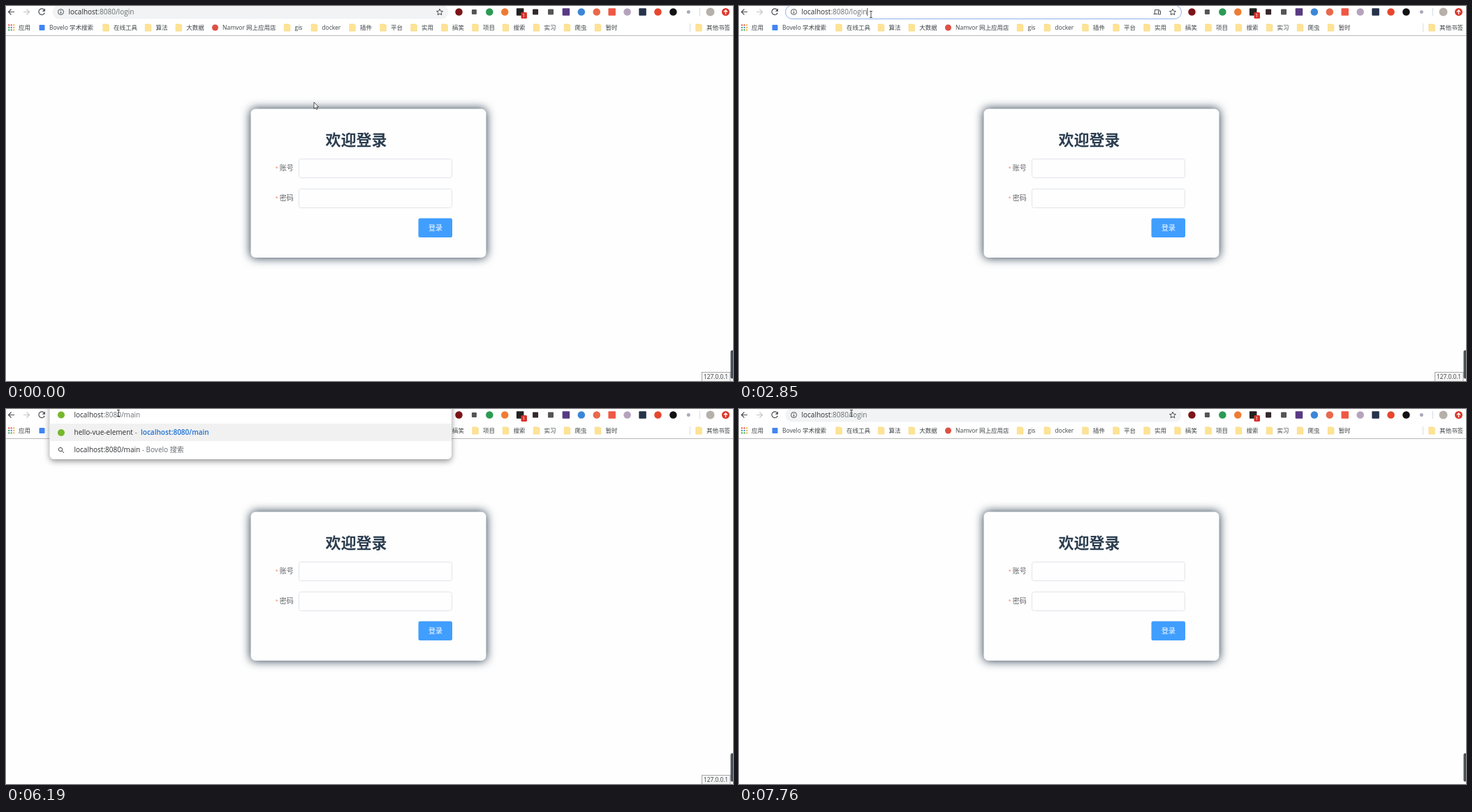
Write an HTML page that moves like this. It is 1041 by 538 pixels and loops after 8 s.

```html
<!DOCTYPE html>
<html lang="zh-CN">
<head>
<meta charset="utf-8">
<title>Login</title>
<style>
  html, body { margin: 0; width: 100%; height: 100%; overflow: hidden; background: #fefefe; }
  svg { display: block; }
  text { font: 10px "Open Sans", "Noto Sans CJK SC", "Noto Sans CJK", sans-serif; white-space: pre; fill: #2b2d30; }
  .small text, text.small { font-size: 8.5px; fill: #3c4043; }
  .line { fill: none; stroke: #4a4d51; stroke-width: 1.2; }
  .thin { stroke-width: 1; }
  .gray { fill: #686d72; }
  .label { fill: #606266; }
  .star { font-size: 7px; fill: #f0825f; }
  .field { fill: #fefefe; stroke: #e2e4ea; }
  #shadow { fill: #2c3e50; filter: blur(7px); }
  #drop { filter: drop-shadow(0 3px 4px rgba(0, 0, 0, .42)); }
</style>
</head>
<body>
<svg width="1041" height="538" viewBox="0 0 1041 538">
  <rect width="1041" height="43" fill="#fff"/>
  <path d="M0 42.5H1041" stroke="#b8b8b8"/>

  <g id="toolbar">
    <path class="line" d="M12 8.5H3.5M7.500 4.500l-4 4 4 4"/>
    <path class="line" d="M25 8.5h8.5M29.5 4.5l4 4-4 4" style="stroke:#c4c6c8"/>
    <g id="reload">
      <path class="line" d="M54.3 5.2A4.3 4.3 0 1 0 55.3 9.7"/>
      <path d="M56 3.5v4.3h-4.3z" fill="#4a4d51"/>
    </g>
    <path id="stop" class="line" d="M47.5 4.5l8 8m0-8l-8 8"/>
    <rect id="pill" x="66.5" y="-1" width="567" height="19.5" rx="9.75"/>
    <g id="info">
      <circle class="line thin" cx="78.5" cy="8.5" r="4"/>
      <path class="line" d="M78.5 8v3M78.5 6v1"/>
    </g>
    <path id="star" class="line thin" d="M621 4.2l1.3 3 3.2.3-2.4 2.1.7 3.2-2.8-1.7-2.8 1.7.7-3.2-2.4-2.1 3.2-.3z"/>
    <path id="device" class="line thin" d="M602 5.5H595.5V11M593.5 11.5h6M600.5 7h3v5h-3z"/>
  </g>
  <g id="extensions"></g>
  <g id="bookmarks" class="small"></g>

  <g id="card">
    <rect id="shadow" x="350" y="147" width="338" height="214.5" rx="7"/>
    <rect x="350.5" y="147.5" width="337" height="213.5" rx="7" fill="#fefefe"/>
    <text x="457.5" y="199.7" style="font-size:22px;font-weight:700;fill:#2c3e50">欢迎登录</text>
    <text class="star" x="385.7" y="235.3">*</text>
    <text class="label" x="391.7" y="236.3">账号</text>
    <rect class="field" x="419.5" y="219.5" width="219" height="27" rx="3"/>
    <text class="star" x="385.7" y="278.3">*</text>
    <text class="label" x="391.7" y="279.3">密码</text>
    <rect class="field" x="419.5" y="262.5" width="219" height="27" rx="3"/>
    <rect x="590.5" y="304.5" width="48.5" height="27.5" rx="2.5" fill="#409eff"/>
    <text x="605" y="321.8" style="fill:#fff">登录</text>
  </g>

  <g id="tip">
    <rect x="996.5" y="525.5" width="40.5" height="14" fill="#f4f4f4" stroke="#a8a8a8"/>
    <text class="small" x="999" y="535.3" style="font-size:8.3px">127.0.0.1</text>
  </g>
  <rect x="1037.5" y="494" width="6" height="40.5" rx="2" fill="#4b4f57"/>
  <g id="status">
    <rect x="-5" y="523.5" width="347" height="20" rx="3" fill="#fff" stroke="#dcdcdc"/>
    <text class="small" x="-7.5" y="534.3" style="fill:#70757a">正在连接...</text>
  </g>

  <g id="drop">
    <rect x="62.5" y="-10" width="575.5" height="82" rx="6" fill="#fff"/>
    <rect x="62.5" y="21" width="575.5" height="25" fill="#f1f1f1"/>
    <circle cx="79" cy="34" r="5" fill="#76b82a"/>
    <text x="97.5" y="37.3">hello-vue-element<tspan class="gray"> - </tspan><tspan x="193" style="fill:#1a6fd4;font-weight:600">localhost:8080/main</tspan></text>
    <path class="line thin" d="M80 60l3 3M75.3 58a2.7 2.7 0 1 0 5.4 0a2.7 2.7 0 1 0-5.4 0"/>
    <text x="97.5" y="62.3"><tspan id="query"></tspan><tspan class="gray"> - Bovelo 搜索</tspan></text>
  </g>

  <circle id="site" cx="79" cy="8.5" r="5" fill="#76b82a"/>
  <rect id="mark" y="2" height="14" fill="#0078d7"/>
  <text id="url" y="12"><tspan>localhost</tspan><tspan class="gray" id="path"></tspan><tspan id="picked" style="fill:#fff"></tspan></text>
  <path id="caret" d="M0 3V14" stroke="#222" stroke-width=".8"/>
  <path id="arrow" d="M0 0V9.5L2.2 7.6 3.6 10.4 5 9.8 3.7 7H6.5Z" fill="#fff" stroke="#111" stroke-width=".7"/>
  <path id="beam" d="M-2-4.5H2M0-4.5V4.5M-2 4.5H2" stroke="#222" stroke-width=".8"/>
</svg>

<script>
const $ = id => document.getElementById(id);
const square = (x, y, s, c) => `<rect x="${x - s / 2}" y="${y - s / 2}" width="${s}" height="${s}" rx="1" fill="${c}"/>`;
const circle = (x, y, r, c) => `<circle cx="${x}" cy="${y}" r="${r}" fill="${c}"/>`;
const label = (x, s) => `<text x="${x}" y="34">${s}</text>`;
const folder = (x, s) =>
  `<path d="M${x - 4.2} 26h6.500v1h2v9h-8.500z" fill="#ffe394" stroke="#f3d376" stroke-width=".6"/>` + label(x + 11, s);

// Extension icons are evenly spaced; "o" is round, "s" is square.
const extensions = ['o#7c1418', 's#555', 'o#2b9a55', 'o#ef7b33', 's#222', 's#33272b', 's#555', 's#583a83', 'o#3b86d8',
  'o#e8694c', 's#ef5844', 'o#b5a3bd', 's#25324a', 'o#e5472f', 'o#111', 'o#a9a9b8'];
const size = { 1: 7, 5: 8, 6: 8, 15: 5 };
$('extensions').innerHTML = extensions.map((e, i) => {
  const x = 648.5 + i * 21.92, s = size[i] || 10.5, c = e.slice(1);
  return e[0] === 'o' ? circle(x, 8.5, s / 2, c) : square(x, 8.5, s, c);
}).join('') + `
  <rect x="737.5" y="9" width="8.5" height="9" rx="1.5" fill="#d8322b"/>
  <text x="739.6" y="16.3" style="font-size:7px;fill:#fff">1</text>
  <path d="M993.5 3V14" stroke="#cfdcec"/>
  ${circle(1008.5, 8.5, 6, '#b5b0aa')}${circle(1030.5, 8.5, 5.5, '#dc382c')}
  <path d="M1030.5 12V6M1028 8.5l2.5-2.5 2.5 2.5" fill="none" stroke="#fff" stroke-width="1.3"/>`;

const dots = ['#e2574c', '#e2574c', '#eeb33b', '#48a463', '#4a86e8', '#eeb33b', '#48a463', '#48a463', '#eeb33b'];
const folders = { 143: '在线工具', 203.5: '算法', 247.3: '大数据', 402.5: 'gis', 441.3: 'docker', 496: '插件', 540: '平台',
  584: '实用', 628: '搞笑', 672: '项目', 715.5: '搜索', 759.5: '实习', 803.5: '爬虫', 847.5: '暂时', 992: '其他书签' };
$('bookmarks').innerHTML =
  dots.map((c, i) => square(4.2 + i % 3 * 3.5, 27.3 + Math.floor(i / 3) * 3.5, 2.3, c)).join('') +
  label(18, '应用') + square(51.5, 31, 8, '#4285f4') + label(62, 'Bovelo 学术搜索') +
  circle(299.5, 31, 4.5, '#dd5144') + label(310, 'Namvor 网上应用店') +
  Object.entries(folders).map(([x, s]) => folder(+x, s)).join('') +
  '<path d="M979.5 25V37" stroke="#dadce0"/>';

// Pointer moves: first step, last step, number of steps, way points
const moves = [
  [580, 740, 3, [441, 138], [221, 123]],
  [890, 1130, 4, [221, 123], [371, 223]],
  [1270, 1590, 5, [371, 223], [403, 237], [398, 226]],
  [1690, 2070, 6, [398, 226], [210, 48]],
  [2150, 2620, 7, [210, 48], [82, 7], [189, 12]],
  [3080, 3550, 7, [189, 12], [161, 6]],
];
const progress = (t, [start, end, n]) =>
  t < start ? 0 : Math.min(1, (Math.floor((t - start) / (end - start) * (n - 1) + 1e-6) + 1) / n);

function pointer(t) {
  const move = moves.findLast(m => t >= m[0]) || moves[0];
  const pts = move.slice(3), p = progress(t, move) * (pts.length - 1);
  const i = Math.min(Math.floor(p), pts.length - 2);
  return pts[i].map((v, k) => v + (pts[i + 1][k] - v) * (p - i));
}

const fade = (id, opacity) => {
  $(id).style.opacity = +opacity;
  $(id).style.display = opacity ? '' : 'none';
};
// Value of the last [time, value] pair reached
const step = (t, ...keys) => keys.findLast(k => t >= k[0])[1];

function draw(t) {
  const between = (a, b) => t >= a && t < b;
  const focus = between(2790, 4790), open = between(4790, 6350);
  const loading = between(6350, 7370);

  fade('stop', loading);
  fade('reload', !loading);
  fade('pill', !open);
  $('pill').style.fill = focus ? '#fff' : '#f1f3f4';
  $('pill').style.stroke = focus ? '#8ab0ee' : 'none';
  fade('info', !open);
  fade('star', !open);
  fade('site', open);
  fade('device', between(2850, 4790));
  fade('card', !between(6660, 7150));
  fade('tip', t < 6660);
  fade('status', step(t, [0, 0], [6740, .6], [6820, 1], [7590, .6], [7680, .3], [7760, 0]));
  fade('drop', step(t, [0, 0], [4790, .12], [4860, 1], [6350, .3], [6430, 0]));

  const word = between(4790, 7070) ? 'main' : 'login';
  const picked = t < 4790 ? Math.round(5 * progress(t, moves[5]))
    : step(t, [4790, 3], [5090, 2], [5260, 1], [5640, 0]);
  const cut = word.length - picked, x = open ? 97.5 : 89.5;
  $('path').textContent = ':8080/' + word.slice(0, cut);
  $('picked').textContent = word.slice(cut);
  $('query').textContent = 'localhost:8080/' + word.slice(0, cut);
  $('url').setAttribute('x', x);

  const total = $('url').getComputedTextLength();
  const width = picked ? $('picked').getComputedTextLength() : 0;
  $('mark').setAttribute('x', x + total - width);
  $('mark').setAttribute('width', width);
  $('caret').setAttribute('transform', `translate(${x + total + .5})`);
  fade('caret', between(2790, 3080) || between(5640, 6190));

  const [px, py] = pointer(t), text = py < 18;
  for (const id of ['arrow', 'beam']) $(id).setAttribute('transform', `translate(${px} ${py})`);
  fade('arrow', !text);
  fade('beam', text);
}

function tick() {
  draw(performance.now() % 8000);
  requestAnimationFrame(tick);
}
tick();
</script>
</body>
</html>
```
